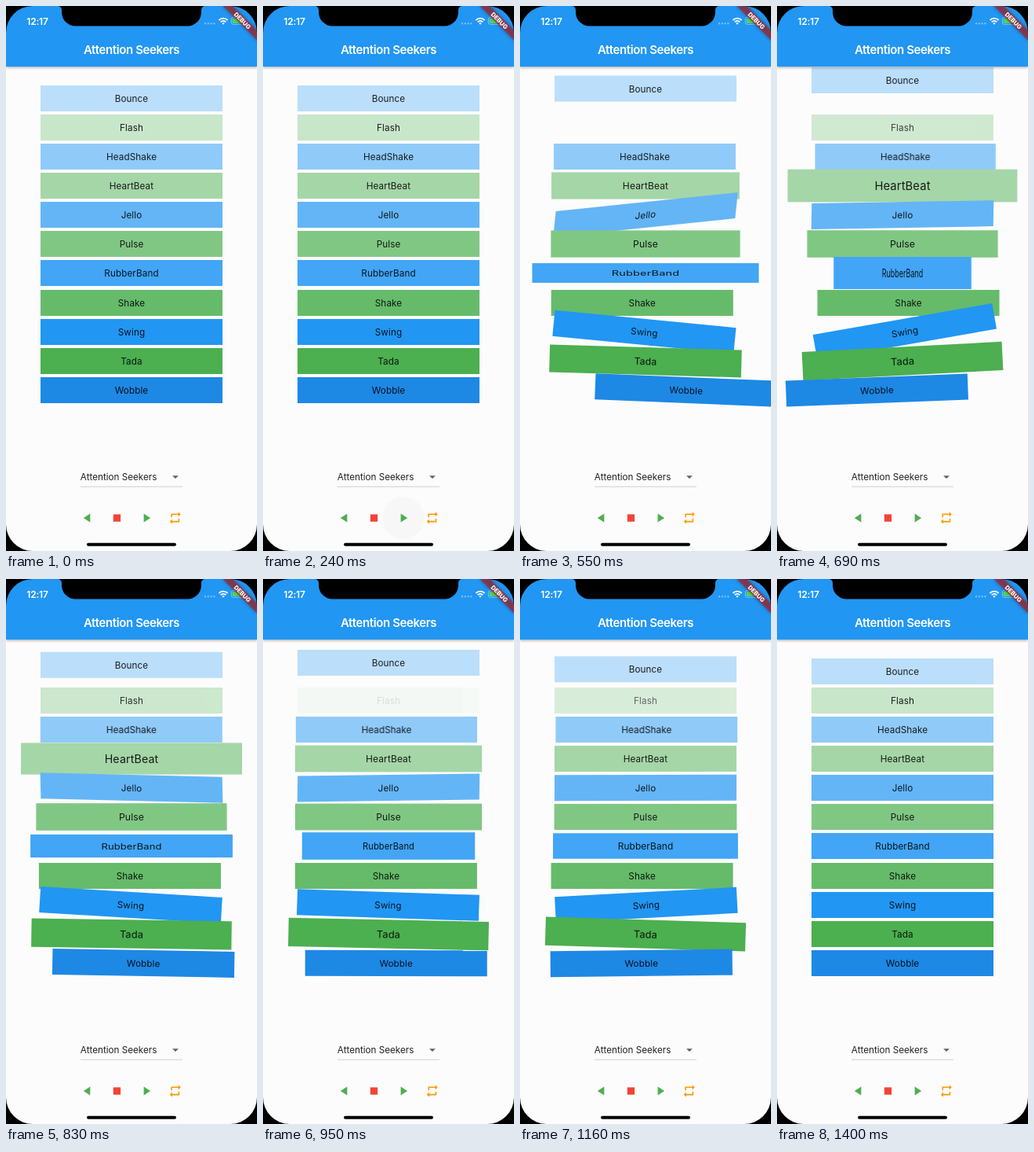
Write an HTML page that moves like this. It is 320 px wide and 693 px high and loops after 1.5 s.

```html
<!DOCTYPE html>
<html lang="en">
<head>
<meta charset="utf-8">
<title>Attention Seekers</title>
<style>
  html, body { margin: 0; width: 100%; height: 100%; overflow: hidden; background: #fcfcfc; }
  body { position: relative; font-family: Inter, "Open Sans", sans-serif; color: rgba(0, 0, 0, .87); }
  #stage { position: absolute; left: 0; top: 0; width: 320px; height: 693px; overflow: hidden; background: #fcfcfc; }
  .row {
    position: absolute; left: 44px; width: 232px; height: 33px;
    font-size: 11.7px; letter-spacing: .1px; line-height: 34.5px; text-align: center; white-space: nowrap;
  }
  #bar {
    position: absolute; left: 0; top: 0; width: 320px; height: 77.3px; background: #2196f3;
    box-shadow: 0 1.5px 3px rgba(0, 0, 0, .3);
  }
  svg { position: absolute; left: 0; top: 0; }
  text { font-family: Inter, "Open Sans", sans-serif; }
</style>
</head>
<body>
<div id="stage">
  <div id="rows"></div>
  <div id="bar"></div>
  <svg width="320" height="693" viewBox="0 0 320 693">
    <text x="160" y="61.3" font-size="15" font-weight="600" letter-spacing="-.4" text-anchor="middle" fill="#fff">Attention Seekers</text>

    <!-- status bar -->
    <text x="40" y="23.6" font-size="12" font-weight="600" letter-spacing="-.2" text-anchor="middle" fill="#fff">12:17</text>
    <path d="M254 22.3h12" stroke="#fff" stroke-opacity=".4" stroke-width="2.4" stroke-linecap="round" stroke-dasharray="0 3.8"/>
    <g fill="none" stroke="#fff" stroke-width="1.8">
      <path d="M271.4 18a8 8 0 0 1 11.2 0M273.7 20.3a4.8 4.8 0 0 1 6.6 0"/>
      <path d="M275.3 21.9a2.5 2.5 0 0 1 3.4 0L277 23.8z" fill="#fff" stroke="none"/>
    </g>
    <rect x="287.3" y="14.6" width="17" height="8.8" rx="2.4" fill="none" stroke="#fff" stroke-opacity=".5" stroke-width=".8"/>
    <rect x="288.6" y="15.9" width="14.4" height="6.2" rx="1.4" fill="#4cd964"/>

    <!-- dropdown -->
    <text x="94.8" y="603.3" font-size="11.7" fill="#000" fill-opacity=".87">Attention Seekers</text>
    <path d="M212.1 597.2h7.8l-3.9 3.9z" fill="#616161"/>
    <path d="M95 611.2h130" stroke="#bdbdbd" stroke-width=".7"/>

    <!-- controls -->
    <circle id="glow" cx="178.8" cy="651" r="27" fill="#bcbcbc"/>
    <circle id="splash" cx="178.8" cy="651" fill="#c8c8c8"/>
    <path d="M107.3 645.6v10.8L98.8 651z" fill="#4caf50"/>
    <rect x="136.8" y="646.4" width="9.3" height="9.3" fill="#f44336"/>
    <path d="M175.6 645.6v10.8l8.5-5.4z" fill="#4caf50"/>
    <path transform="translate(206.5 641.7) scale(.773)" fill="#ff9800"
      d="M7 7h10v3l4-4-4-4v3H5v6h2zM17 17H7v-3l-4 4 4 4v-3h12v-6h-2z"/>

    <!-- corner ribbon -->
    <g transform="translate(320 0) rotate(45)">
      <rect x="-30.9" y="21.6" width="61.8" height="9.3" fill="#b71c1c" fill-opacity=".63"
        style="filter: drop-shadow(0 0 2.3px rgba(0,0,0,.5))"/>
      <text y="29.1" font-size="7.7" font-weight="800" text-anchor="middle" fill="#fff">DEBUG</text>
    </g>

    <!-- device outline -->
    <path fill-rule="evenodd" d="M0 0H320V693H0zM34 0A34 34 0 0 0 0 34V659A34 34 0 0 0 34 693H286A34 34 0 0 0 320 659V34A34 34 0 0 0 286 0z"/>
    <path d="M66 0A5 5 0 0 1 71 5V8A17.500 17.500 0 0 0 88.500 25.500H231.500A17.500 17.500 0 0 0 249 8V5A5 5 0 0 1 254 0z"/>
    <rect x="103" y="682.700" width="114" height="4" rx="2"/>
  </svg>
</div>
<script>
const LOOP = 1500, START = 300, DURATION = 1015;
const UNIT = 320 / 414; // logical pixel on the stage

const clamp = x => Math.min(1, Math.max(0, x));
const sign = i => i % 2 ? -1 : 1;

function bezier(x1, y1, x2, y2) {
  const at = (a, b, u) => 3 * a * u * (1 - u) ** 2 + 3 * b * u * u * (1 - u) + u ** 3;
  return x => {
    let lo = 0, hi = 1;
    for (let i = 0; i < 24; i++) {
      const mid = (lo + hi) / 2;
      if (at(x1, x2, mid) < x) lo = mid; else hi = mid;
    }
    return at(y1, y2, lo);
  };
}
const ease = bezier(.25, .1, .25, 1);
const inOut = bezier(.42, 0, .58, 1);
const rise = bezier(.215, .61, .355, 1);
const fall = bezier(.755, .05, .855, .06);

// Eases between n + 1 key values; place(i) is where each key sits.
function keyed(n, value, curve = ease, place = i => i / n) {
  return p => {
    let i = 0;
    while (i < n - 1 && place(i + 1) <= p) i++;
    const k = curve(clamp((p - place(i)) / (place(i + 1) - place(i))));
    return value(i) + (value(i + 1) - value(i)) * k;
  };
}

// A swing that starts and ends at rest and changes side at every key.
const wave = (n, size, curve, place) =>
  keyed(n, i => i % n ? sign(i) * size(i) : 0, curve, place);

const hop = (p, from, top, to, height) =>
  height * (p < top ? rise(clamp((p - from) / (top - from))) : 1 - fall(clamp((p - top) / (to - top))));

const flash = keyed(4, i => 1 - i % 2);
const nod = wave(5, i => 7.5 - 1.4 * i, inOut, i => i % 5 ? i / 4 - .12 : i / 5);
const beat = keyed(4, i => 1 + .3 * (i % 2), inOut, i => i < 4 ? .14 * i : .7);
const jelly = wave(9, i => i < 2 ? 0 : -12.5 / 2 ** (i - 2));
const pulse = keyed(2, i => 1 + .05 * (i % 2));
const stretch = [0, .25, -.25, .15, -.05, .05, 0];
const stretchAt = [0, .3, .4, .5, .65, .75, 1];
const band = keyed(6, i => stretch[i], ease, i => stretchAt[i]);
const shake = wave(10, () => 10);
const swing = wave(5, i => -Math.max(5, 20 - 5 * i));
const tadaSize = keyed(10, i => i % 10 ? (i < 3 ? .9 : 1.1) : 1);
const tadaTurn = wave(10, i => i === 1 ? 3 : -3);
const wobbleAt = i => i < 6 ? .15 * i : 1;
const wobble = wave(6, i => 16 * (6 - i), ease, wobbleAt);
const wobbleTurn = wave(6, i => Math.round(10 / (i + 1)), ease, wobbleAt);

const shift = x => `translateX(${x * UNIT}px)`;

// name, colour, style at progress p
const effects = [
  ["Bounce", "#bbdefb", p => {
    const y = hop(p, .2, .42, .53, 30) + hop(p, .53, .7, .8, 15) + hop(p, .8, .9, 1, 4);
    return { transform: `translateY(${-y * UNIT}px)` };
  }],
  ["Flash", "#c8e6c9", p => ({ opacity: flash(p) })],
  ["HeadShake", "#90caf9", p => ({ transform: `${shift(nod(p))} rotateY(${1.5 * nod(p)}deg)` })],
  ["HeartBeat", "#a5d6a7", p => ({ transform: `scale(${beat(p)})` })],
  ["Jello", "#64b5f6", p => {
    const k = Math.tan(jelly(p) * Math.PI / 180);
    return { transform: `matrix(1,${k},${k},1,0,0)` };
  }],
  ["Pulse", "#81c784", p => ({ transform: `scale(${pulse(p)})` })],
  ["RubberBand", "#42a5f5", p => ({ transform: `scale(${1 + band(p)},${1 - band(p)})` })],
  ["Shake", "#66bb6a", p => ({ transform: shift(shake(p)) })],
  ["Swing", "#2196f3", p => ({ transform: `rotate(${swing(p)}deg)`, transformOrigin: "50% 0" })],
  ["Tada", "#4caf50", p => ({ transform: `scale(${tadaSize(p)}) rotate(${tadaTurn(p)}deg)` })],
  ["Wobble", "#1e88e5", p => ({ transform: `translateX(${wobble(p)}px) rotate(${wobbleTurn(p)}deg)` })]
];

const byId = id => document.getElementById(id);
const rows = effects.map(([name, colour], i) => {
  const el = document.createElement("div");
  el.className = "row";
  el.textContent = name;
  el.style.background = colour;
  el.style.top = 100.6 + 37.14 * i + "px";
  byId("rows").append(el);
  return el;
});

function draw(t) {
  const p = clamp((t - START) / DURATION);
  effects.forEach(([, , pose], i) => Object.assign(rows[i].style, pose(p)));

  // Press highlight, then a splash once the button is let go.
  byId("glow").setAttribute("opacity", .2 * clamp(1 - Math.abs(t - START) / 100));
  byId("splash").setAttribute("r", 27 * clamp((t - START) / 35));
  byId("splash").setAttribute("opacity", .4 * clamp(1 - (t - START) / 200));
}

const origin = performance.now();
function loop() {
  draw((performance.now() - origin) % LOOP);
  requestAnimationFrame(loop);
}
loop();
</script>
</body>
</html>
```
